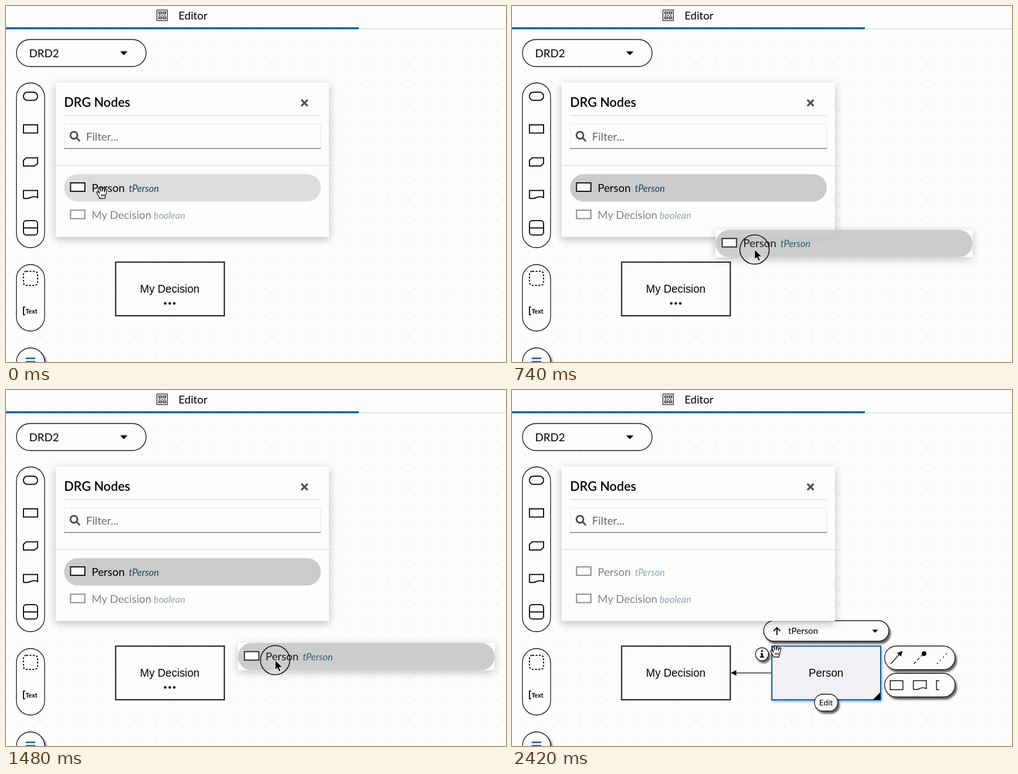
Recreate the animation shown at these times as an HTML page. Size 887 by 632 pixels, loop 2.44 s.

```html
<!DOCTYPE html>
<html lang="en">
<head>
<meta charset="utf-8">
<title>Drag a node onto the diagram</title>
<style>
  html, body { margin: 0; width: 100%; height: 100%; overflow: hidden; background: #fdfdfc; }
  svg { display: block; font: 19.4px Lato, sans-serif; }
  .line { fill: none; stroke: #111; stroke-width: 2; }
  .box { fill: #fdfdfc; stroke: #111; stroke-width: 2; }
  .pill { fill: #fdfdfc; stroke: #111; stroke-width: 1.3; }
  .node { font: 19.36px "Liberation Sans", Arial, sans-serif; text-anchor: middle; }
  .type { font-size: 16.9px; font-style: italic; fill: #1c4653; }
  .raised { filter: drop-shadow(3px 4px 1.5px #0009); }
  .soft { filter: drop-shadow(0 4px 8px #0004); }
  .dim { opacity: .48; }
</style>
</head>
<body>
<svg width="887" height="632" viewBox="0 0 887 632">
  <defs>
    <pattern id="dots" x="192.6" y="452.6" width="24.2" height="24.2" patternUnits="userSpaceOnUse">
      <rect width="1.2" height="1.2" fill="#b4b4c4"/>
    </pattern>
    <g id="person">
      <rect class="box" x="114.5" y="314" width="25.5" height="15"/>
      <text x="152" y="329.5">Person</text>
      <text class="type" x="218" y="329.5">tPerson</text>
    </g>
  </defs>

  <rect width="887" height="632" fill="#fdfdfc"/>
  <rect y="42" width="887" height="590" fill="url(#dots)"/>
  <path d="M0 40.5H887" stroke="#cfcde6" stroke-width="1.2"/>
  <path d="M0 39.5H626" stroke="#0a58b0" stroke-width="3.4"/>
  <g fill="none" stroke="#222" stroke-width="1.3">
    <rect x="267.7" y="7.2" width="18.6" height="18.6"/>
    <path d="M271 10.5h5v3h-5zM278.500 10.500h5v3h-5zM271 19.500h5v3h-5zM278.500 19.500h5v3h-5zM271 16.500h3M275.500 16.500h3M280 16.500h3"/>
  </g>
  <text x="306" y="24">Editor</text>

  <rect class="pill" x="18.500" y="59.500" width="230" height="48" rx="24"/>
  <text x="41" y="91">DRD2</text>
  <path d="M202.500 80.500h13l-6.500 7z"/>

  <rect class="pill" x="18.500" y="136.500" width="50" height="292.500" rx="25"/>
  <rect class="pill" x="18.500" y="459" width="50" height="118" rx="25"/>
  <circle class="pill raised" cx="43.500" cy="632" r="25"/>
  <g class="line">
    <rect x="31" y="153" width="25" height="14.500" rx="7"/>
    <rect x="31" y="211" width="25" height="14.500"/>
    <path d="M36 269.500H56V279.500L51 284H31V274z"/>
    <path d="M31 327.500H56V340Q50 337 43.500 340T31 341z"/>
    <rect x="31" y="381" width="25" height="25.500" rx="5"/>
    <path d="M31 394H56"/>
    <rect x="31" y="471" width="25" height="25" rx="5" stroke-dasharray="3.200 2.600"/>
    <path d="M34 534.500H31V548H34"/>
  </g>
  <text x="34.500" y="546" font-size="11.200" font-weight="700">Text</text>
  <path d="M35 625.500H52M35 631.500H52" stroke="#0a58b0" stroke-width="2.400"/>

  <rect class="box" x="194.500" y="454.700" width="192.800" height="95.200"/>
  <text class="node" x="290.500" y="509">My Decision</text>
  <g id="ellipsis"><circle cx="282.500" cy="528" r="2.300"/><circle cx="290.500" cy="528" r="2.300"/><circle cx="298.500" cy="528" r="2.300"/></g>

  <g id="dropped">
    <path d="M461 502.300H396" stroke="#111" stroke-width="1.300"/>
    <path d="M388 502.300l10-5v10z"/>
    <rect x="461" y="454.700" width="193" height="95.200" fill="#f0f1f4" stroke="#0d5f8f" stroke-width="2" style="filter:drop-shadow(1px 2px 2px #06c9)"/>
    <text class="node" x="557" y="509">Person</text>
  </g>

  <g id="tools">
    <path d="M653 537V550H640z"/>
    <rect class="pill raised" x="446.500" y="409.500" width="222" height="36.500" rx="18.200"/>
    <path class="line" d="M470 435V422M464 428l6-6 6 6"/>
    <text x="490" y="433" font-size="15.700">tPerson</text>
    <path d="M639 425.500h10.500l-5.200 5.500z"/>
    <rect class="pill raised" x="661" y="454.500" width="125" height="42" rx="21"/>
    <rect class="pill raised" x="661" y="503" width="125" height="42" rx="21"/>
    <g fill="none" stroke="#111" stroke-width="1.500">
      <path d="M672 486L690 466"/>
      <path d="M713 486L730 468" stroke-dasharray="5 4"/>
      <path d="M754 486L772 467" stroke-width="1.800" stroke-dasharray="1.800 6"/>
      <rect x="671" y="516" width="22.500" height="16"/>
      <path d="M712 516H735V530Q729 527 723.500 530T712 531zM758 516H753V532H758"/>
    </g>
    <path d="M693 463l-3 10-7-6z"/>
    <circle cx="731" cy="468" r="4.200"/>
    <circle class="pill raised" cx="443.500" cy="469" r="11.500"/>
    <path d="M441 467h4v6h2v2h-7v-2h2v-4h-1zM442 462h3v3h-3z"/>
    <rect class="pill raised" x="536.500" y="540" width="41.500" height="30" rx="15"/>
    <text x="557" y="560" font-size="14.200" text-anchor="middle">Edit</text>
  </g>

  <rect class="soft" x="88" y="136" width="485" height="274" fill="#fdfdfc"/>
  <text x="103" y="179" font-size="22.500" font-weight="600">DRG Nodes</text>
  <path d="M524 166.500l11 11M535 166.500l-11 11" stroke="#4d4f54" stroke-width="3.200"/>
  <path d="M103 194.500H558.500M88 283H573" stroke="#cbc9e0" stroke-width="1.200"/>
  <rect x="103.500" y="210" width="455" height="43" fill="none" stroke="#e6e5ef"/>
  <path d="M103 253H558.500" stroke="#777982" stroke-width="1.300"/>
  <g fill="none" stroke="#4d4f54" stroke-width="3"><circle cx="120.500" cy="229.500" r="6.200"/><path d="M125 234l6 6"/></g>
  <text x="142" y="238.500" fill="#66686f">Filter...</text>
  <rect id="highlight" x="103" y="298.500" width="455.500" height="48.500" rx="24.200"/>
  <use id="row" href="#person"/>
  <g class="dim">
    <rect class="box" x="114.500" y="362.500" width="25.500" height="15"/>
    <text x="152" y="378">My Decision</text>
    <text class="type" x="262" y="378">boolean</text>
  </g>

  <g id="ghost" opacity=".88">
    <rect class="soft" x="103" y="298.500" width="455.500" height="48.500" fill="#fff"/>
    <rect x="103" y="298.500" width="455.500" height="48.500" rx="24.200" fill="#c6c6c6"/>
    <use href="#person"/>
  </g>

  <g id="cursor">
    <circle id="press" class="line" r="26" style="stroke-width:1.600"/>
    <path id="arrow" d="M0 0V17.500L4 14L7 20.500L10 19L7.200 12.800H13z" stroke="#fff"/>
    <path id="hand" d="M-4 10.500C-5 6-8 4-9 0C-9-2-7-2-5.500 0L-4 2L-6.500-5C-7-8-4.500-8.500-3.500-6L-2-2L-2.500-8C-2-10.500 0-10 .5-8L1-2L2.500-8C3.500-10 5.500-9 5-7L4.500-1L6.500-5C8-7 9.500-5.500 9-3.500L7 4L5.500 10.500zM-.5 3v4M2 3v4M4.500 3v4" fill="#fff" stroke="#111" stroke-width="1.300" stroke-linejoin="round"/>
  </g>
</svg>
<script>
const LOOP = 2440, PRESS = 160, DRAG = 280, DROP = 1620, HOVER = 1940;
const $ = id => document.getElementById(id);
const show = (id, on) => $(id).style.display = on ? '' : 'none';
const move = (id, [x, y]) => $(id).setAttribute('transform', `translate(${x} ${y})`);

// Keys are [time, x, y].
const cursorKeys = [[0, 170, 331], [180, 171, 331], [360, 214.500, 343], [540, 330, 388], [740, 430, 432],
  [920, 467, 468], [1140, 477.500, 479], [1500, 477.500, 479.500], [1800, 466, 460], [2000, 468, 463.500], [LOOP, 468, 463.500]];
const ghostKeys = [[DRAG, 0, 0], [360, 22, 7], [540, 143, 50], [740, 258, 98.500],
  [920, 294, 134], [1140, 305, 145], [1300, 308.500, 150.500], [LOOP, 308.500, 150.500]];

// Slope is flat wherever the motion rests or turns, so the curve never overshoots.
function slope(keys, i, axis) {
  const [a, b, c] = [keys[i - 1], keys[i], keys[i + 1]];
  if (!a || !c) return 0;
  const before = (b[axis] - a[axis]) / (b[0] - a[0]);
  const after = (c[axis] - b[axis]) / (c[0] - b[0]);
  return before * after > 0 ? 2 * before * after / (before + after) : 0;
}

function along(keys, t) {
  const i = Math.max(0, keys.findIndex(k => k[0] > t) - 1);
  const a = keys[i], b = keys[i + 1], span = b[0] - a[0];
  const u = Math.max(0, (t - a[0]) / span), v = 1 - u;
  return [1, 2].map(axis =>
    v * v * (1 + 2 * u) * a[axis] + u * u * (3 - 2 * u) * b[axis] +
    span * u * v * (v * slope(keys, i, axis) - u * slope(keys, i + 1, axis)));
}

function draw(now) {
  const t = now % LOOP;
  const pressed = t >= PRESS && t < DROP;
  const dropped = t >= DROP;
  const hand = t < PRESS || t >= HOVER;
  move('cursor', along(cursorKeys, t));
  move('ghost', along(ghostKeys, t));
  show('ghost', t >= DRAG && !dropped);
  show('press', pressed);
  show('hand', hand);
  show('arrow', !hand);
  show('highlight', !dropped);
  show('ellipsis', !dropped);
  show('dropped', dropped);
  show('tools', t >= HOVER);
  $('highlight').setAttribute('fill', pressed ? '#cbcbcb' : '#dcdcdc');
  $('row').setAttribute('class', dropped ? 'dim' : '');
  requestAnimationFrame(draw);
}
draw(performance.now());
</script>
</body>
</html>
```
